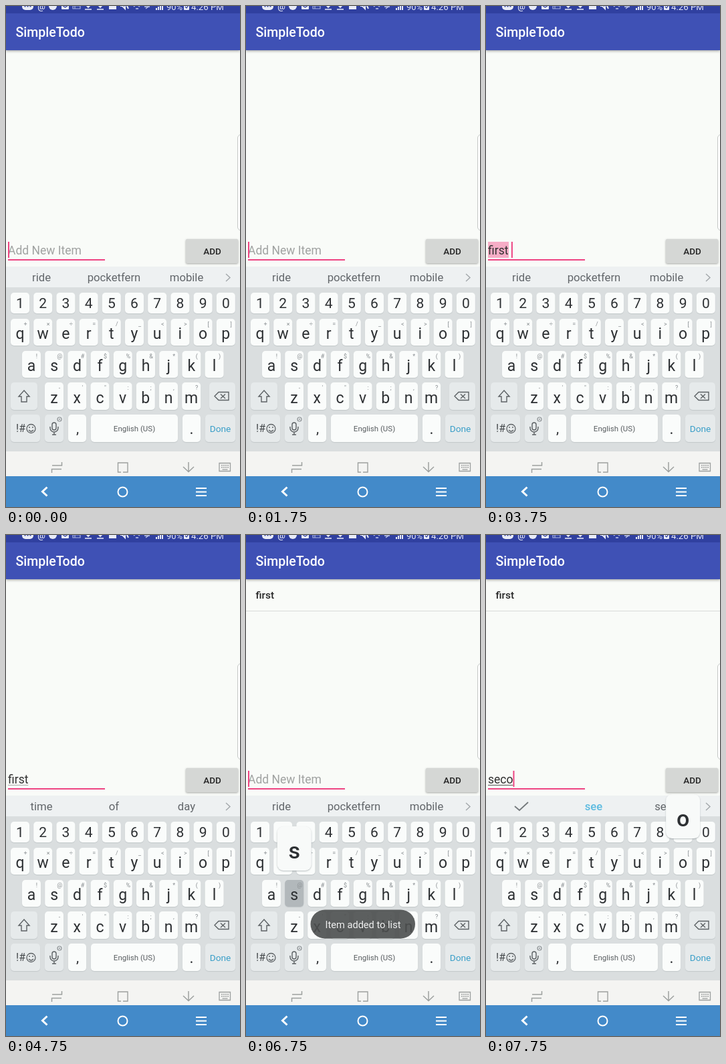
An HTML page with a canvas that plays this animation: 350x748 px, repeating every 8000 ms.

```html
<!DOCTYPE html>
<html lang="en">
<head>
<meta charset="utf-8">
<title>SimpleTodo</title>
<style>
html, body { margin: 0; width: 100%; height: 100%; overflow: hidden; background: #f9fbf8; }
canvas { display: block; width: 350px; height: 748px; }
</style>
</head>
<body>
<canvas id="stage" width="350" height="748"></canvas>
<script>
const ctx = document.getElementById('stage').getContext('2d');
const LOOP = 8000, PITCH = 34.2;
const INK = '#2d3033', GREY = '#62666a', PINK = '#ee4482';
const between = (t, a, b) => t >= a && t < b;

function rect(x, y, w, h, color) {
  ctx.fillStyle = color;
  ctx.fillRect(x, y, w, h);
}

function round(x, y, w, h, r, color) {
  ctx.beginPath();
  ctx.roundRect(x, y, w, h, r);
  ctx.fillStyle = color;
  ctx.fill();
}

function text(str, x, y, size, color, align = 'center', weight = 400) {
  ctx.font = `${weight} ${size}px Roboto, sans-serif`;
  ctx.textAlign = align;
  ctx.fillStyle = color;
  ctx.fillText(str, x, y);
}

function stroke(path, color, width = 1.5) {
  ctx.strokeStyle = color;
  ctx.lineWidth = width;
  ctx.stroke(new Path2D(path));
}

function dot(x, y, r, color) {
  ctx.beginPath();
  ctx.arc(x, y, r, 0, Math.PI * 2);
  ctx.fillStyle = color;
  ctx.fill();
}

function withShadow(color, blur, dy, draw) {
  ctx.save();
  ctx.shadowColor = color;
  ctx.shadowBlur = blur;
  ctx.shadowOffsetY = dy;
  draw();
  ctx.restore();
}

const rows = [
  { keys: '1234567890', hints: '', x: 21, y: 428, h: 31, size: 21, base: 451 },
  { keys: 'qwertyuiop', hints: '+×÷=/_<>[]', x: 21, y: 467, h: 40, size: 23, base: 497 },
  { keys: 'asdfghjkl', hints: '!@#$%&*()', x: 38, y: 515, h: 40, size: 23, base: 545 },
  { keys: 'zxcvbnm', hints: '-\'":;,?', x: 72, y: 562, h: 41, size: 23, base: 593 }
];

const presses = [
  { key: 's', from: 6700, up: 6900, to: 6960 },
  { key: 'e', from: 7050, up: 7180, to: 7300 },
  { key: 'c', from: 7380, up: 7480, to: 7580 },
  { key: 'o', from: 7640, up: 7720, to: 8000 }
];

function keyCenter(key) {
  const row = rows.find(r => r.keys.includes(key));
  return { x: row.x + row.keys.indexOf(key) * PITCH, y: row.y + row.h / 2 };
}

function statusBar() {
  const white = '#e9ecf7';
  rect(0, 0, 350, 11, '#3040a0');
  round(24, -8, 17, 14, 5, white);
  for (let i = 0; i < 3; i++) dot(28.5 + i * 4, 0.5, 1.1, '#3040a0');
  text('@', 53, 5, 13, white, 'center', 500);
  dot(70, 0, 6, white);
  round(83, -5, 11, 10, 1, white);
  stroke('M84 -1L88.5 2L93 -1', '#3040a0', 1.2);
  stroke('M100 0H111V4H100ZM103 0V4', '#a9b3df', 1.2);
  for (const x of [123, 141]) stroke(`M${x} -4V2M${x - 3} -1L${x} 2L${x + 3} -1M${x - 5} 5H${x + 5}`, white, 1.6);
  rect(154, -5, 11, 10, white);
  stroke('M171 0H174L178 4V-3M180 -2L183 4', white, 2);
  stroke('M191 1L195 -2L200 1M194 4H198M207 1H215M209 4L213 1', '#c4cbea', 1.3);
  for (let i = 0; i < 4; i++) rect(224 + i * 3, 3 - i * 2, 2, 3 + i * 2, white);
  text('90%', 240, 6, 13, white, 'left');
  round(266, -5, 8, 11, 1, white);
  stroke('M268 1L270 3L273 -1', '#3040a0', 1.2);
  text('4:26 PM', 277, 6, 13.3, white, 'left');
}

function header() {
  withShadow('rgba(0,0,0,.4)', 4, 1, () => rect(0, 10, 350, 56, '#3f51b5'));
  statusBar();
  text('SimpleTodo', 14.5, 46, 19.5, '#fff', 'left', 500);
}

function cursorOn(t) {
  const start = t < 3500 ? -250 : t < 4250 ? 3500 : t < 5500 ? 4250 : t < 6900 ? 5500 : t;
  return between(t, 3500, 4250) || Math.floor((t - start) / 500) % 2 === 0;
}

function typedText(t) {
  if (between(t, 3500, 5500)) return 'first';
  return 'seco'.slice(0, presses.filter(p => t >= p.up).length);
}

function inputRow(t) {
  const typed = typedText(t), first = typed === 'first';
  const glow = first && t < 4250;
  if (glow) rect(3, 352, 31, 24, '#f6adc6');
  text(typed || 'Add New Item', 3, 371, 17.5, typed ? '#303030' : '#a0a2a1', 'left');
  const width = typed ? ctx.measureText(typed).width : 0;
  if (typed && !glow) rect(3, 373, width, 1, first ? '#aaa' : '#555');
  if (cursorOn(t)) rect(3 + width + (first ? 4.5 : 0), 352, 2, 24, PINK);
  rect(3, 378, 145, 2, PINK);
  withShadow('rgba(0,0,0,.35)', 3, 1, () => round(269, 348, 78, 36, 2, '#d5d7d5'));
  text('ADD', 308.5, 371, 13.5, '#252525', 'center', 500);
}

function content(t) {
  rect(0, 66, 350, 323, '#f9fbf8');
  if (t >= 5500) {
    text('first', 14.5, 95, 15.5, '#252525', 'left', 500);
    rect(0, 113, 350, 1, '#d9dbd9');
  }
  round(346.5, 192, 12, 143, 5, '#fff');
  ctx.strokeStyle = '#c5c8c6';
  ctx.lineWidth = 1;
  ctx.stroke();
  inputRow(t);
}

function suggestions(t) {
  rect(0, 389, 350, 31, '#eef1f2');
  const y = 411, size = 16.7;
  if (t >= 7180) {
    stroke('M43 405L50 411L63 399', '#74797c', 1.8);
    text('see', 161, y, size, '#5cbbe0', 'center', 500);
    text('seen', 270, y, size, GREY);
  } else {
    const words = between(t, 4250, 5500) ? ['time', 'of', 'day'] : ['ride', 'pocketfern', 'mobile'];
    words.forEach((word, i) => text(word, 53 + i * 108.5, y, size, GREY));
  }
  stroke('M329 400L335 405.5L329 411', '#a2a7aa', 1.4);
}

function keyCap(x, y, w, h, color = '#fafcfb') {
  withShadow('rgba(110,120,125,.2)', 1, 1, () => round(x, y, w, h, 5, color));
}

function functionKeys() {
  const soft = '#e6eaeb', line = '#5d6265';
  keyCap(7, 562, 40, 41, soft);
  stroke('M27 574L35 583H31V591H23V583H19Z', line, 1.4);
  keyCap(304, 562, 39, 41, soft);
  stroke('M312 582.5L318 576.5H333V588.5H318ZM321 579.5L328 586M328 579.5L321 586', line, 1.4);

  keyCap(7, 610, 44, 41, soft);
  text('!#', 22, 636, 16, '#44484b');
  stroke('M44 631A6.5 6.5 0 1 1 31 631A6.5 6.5 0 1 1 44 631M34 633Q37.5 637 41 633', line, 1.3);
  dot(35, 629, 1, line);
  dot(40, 629, 1, line);

  keyCap(58, 610, 28, 41, soft);
  ctx.beginPath();
  ctx.roundRect(69, 622, 6, 11, 3);
  ctx.strokeStyle = line;
  ctx.lineWidth = 1.4;
  ctx.stroke();
  stroke('M66 628V630A6 6 0 0 0 78 630V628M72 636V640M69 640H75', line, 1.4);
  stroke('M83 617A3 3 0 1 1 77 617A3 3 0 1 1 83 617', '#8c9194', 1.2);
  dot(80, 617, 1, '#8c9194');

  keyCap(93, 610, 27, 41);
  text(',', 107, 638, 21, INK);
  keyCap(127, 610, 130, 41);
  text('English (US)', 192, 635, 11.5, '#585d60');
  keyCap(264, 610, 27, 41);
  text('.', 277.5, 639, 23, INK);
  keyCap(298, 610, 45, 41, soft);
  text('Done', 320.5, 636, 13.7, '#3b9fc8');
}

function keyboard(t) {
  rect(0, 420, 350, 245, '#dadedf');
  suggestions(t);
  const held = presses.find(p => between(t, p.from, p.up));
  for (const row of rows) {
    [...row.keys].forEach((key, i) => {
      const x = row.x + i * PITCH;
      keyCap(x - 14, row.y, 28, row.h, held && held.key === key ? '#b2b8bb' : undefined);
      text(key, x, row.base, row.size, INK);
      if (row.hints) text(row.hints[i], x + 8, row.y + 11, 9, '#8a8f92');
    });
  }
  functionKeys();
}

function navigation() {
  const grey = '#9da09f', white = '#fff';
  rect(0, 665, 350, 37, '#f4f4f2');
  stroke('M69 686H83.5V681M83 691.5H68.5V697', grey, 1.5);
  stroke('M172 696H167.5V682H182V696H175', grey, 1.4);
  stroke('M273 681V695M265 688L273 695.5L281 688', grey, 1.5);
  stroke('M319 682.5H335.5V694.5H319Z', grey, 1.3);
  for (const y of [686, 689]) {
    for (let x = 322; x < 334; x += 3) rect(x, y - 1, 2, 1.5, grey);
  }
  stroke('M323.5 692H331.5', grey, 1.3);

  rect(0, 702, 350, 46, '#438ac9');
  stroke('M61.5 718.5L54.5 725L61.5 731.5', white, 3);
  stroke('M181.5 725.5A7 7 0 1 1 167.5 725.5A7 7 0 1 1 181.5 725.5', white, 2);
  stroke('M284 720H300M284 725.5H300M284 731H300', white, 2.2);
}

function toast(t) {
  if (!between(t, 5400, 7500)) return;
  ctx.save();
  ctx.globalAlpha = Math.max(0, Math.min(1, (t - 5400) / 200, (7500 - t) / 200));
  round(96.5, 559.5, 156.5, 43, 21.5, 'rgba(76,78,78,.9)');
  text('Item added to list', 175, 587, 14.6, '#f0f1f1');
  ctx.restore();
}

function keyPreview(t) {
  const press = presses.find(p => between(t, p.from, p.to));
  if (!press) return;
  const { x, y } = keyCenter(press.key);
  withShadow('rgba(70,80,85,.35)', 2, 1, () => round(x - 25.5, y - 100, 51, 66, 9, '#f8faf9'));
  text(press.key, x, y - 52, 34, INK, 'center', 500);
}

function draw(now) {
  const t = now % LOOP;
  content(t);
  header();
  keyboard(t);
  navigation();
  toast(t);
  keyPreview(t);
}

let start;
function frame(now) {
  start ??= now;
  draw(now - start);
  requestAnimationFrame(frame);
}
requestAnimationFrame(frame);
</script>
</body>
</html>
```
